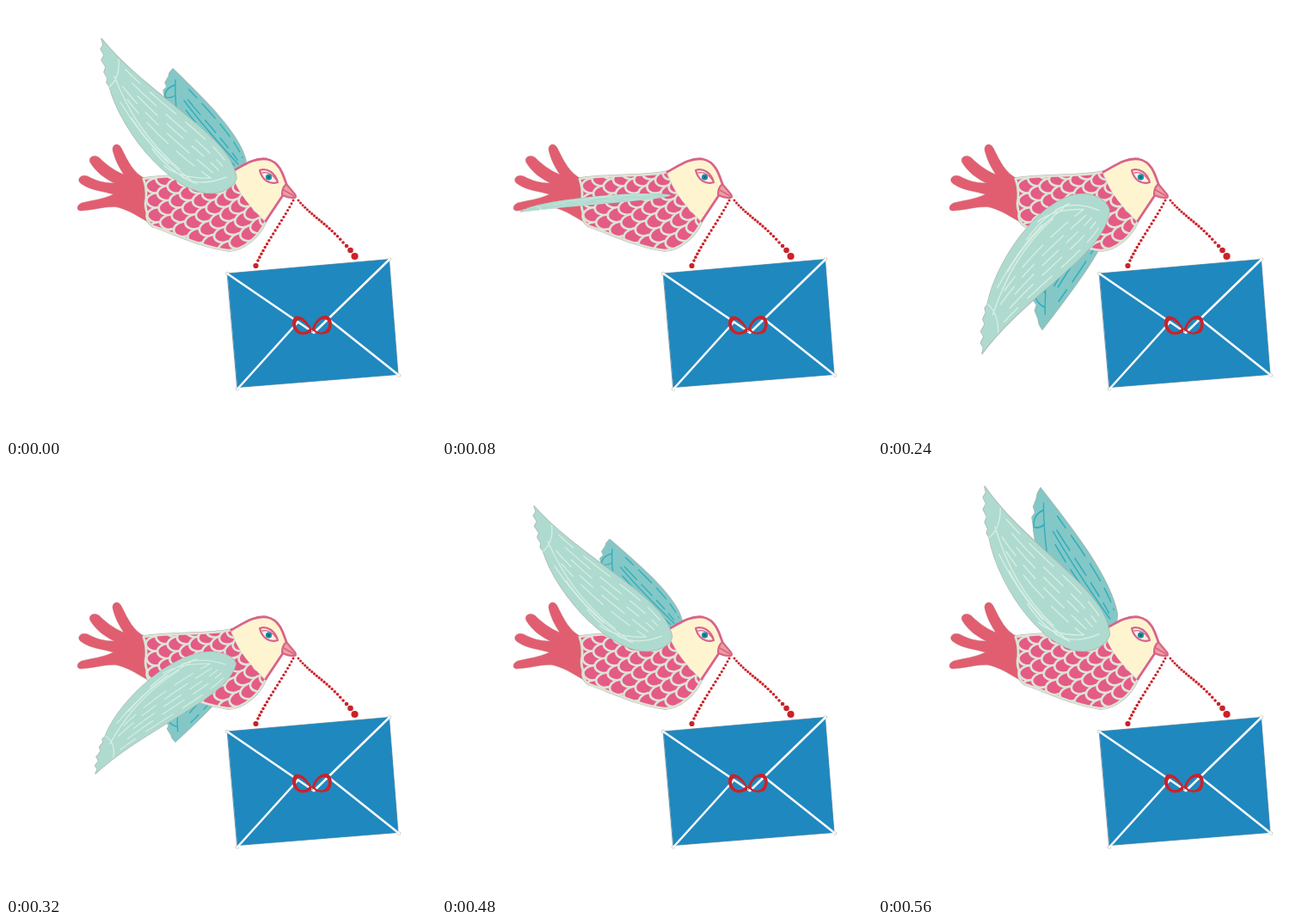
An HTML page with a canvas that plays this animation: 500 by 500 pixels, repeating every 0.64 s.

```html
<!DOCTYPE html>
<html lang="en">
<head>
<meta charset="utf-8">
<title>Bird with a letter</title>
<style>
html, body { margin: 0; width: 100%; height: 100%; overflow: hidden; background: #fff; }
canvas { display: block; width: 100vw; height: 100vh; }
</style>
</head>
<body>
<canvas id="stage"></canvas>
<script>
const SIZE = 500, STEP = 80;
const canvas = document.getElementById('stage');
const ctx = canvas.getContext('2d');
const ratio = window.devicePixelRatio || 1;
canvas.width = canvas.height = SIZE * ratio;

const PINK = '#e45b86', ROSE = '#d8638a', TAIL = '#e15e70';
const LINE = '#dfe3d5', EDGE = '#a9b5ad', RED = '#cb2229';

// Wing poses: [vertical stretch, sideways shift of the tip] for each wing
const POSES = [
  { near: [1, 0], far: [1, 0] },
  { near: [-0.12, -20], far: [-0.1, 5] },
  { near: [-1.01, 7], far: [-1.33, -2] },
  { near: [-1.035, 10], far: [-1.37, -3] },
  { near: [-0.79, -7], far: [-0.935, 3] },
  { near: [0.573, -15], far: [0.344, 5] },
  { near: [0.94, -4], far: [0.88, 1] },
  { near: [1.067, 13], far: [1.37, -5] }
];

const NEAR = {
  fill: '#afdacf', ink: '#d6eee3', pivot: 218, drop: 218, height: 180,
  upper: [111, 38, 165, 105, 262, 150, 268, 200],
  lower: [120, 93, 135, 150, 200, 225, 245, 217],
  shape: 'M111 38 C165 105 262 150 268 200 Q264 213 245 217 C200 225 135 150 120 93' +
    ' L117 89 118 84 114 77 116 71 111 63 114 57 110 50 113 45Z',
  veins: 'M131 62 Q133 84 119 95 M126 82 C142 122 164 158 202 190' +
    ' M133 112 Q158 153 189 183 M146 130 Q172 171 215 202 M170 166 Q190 193 222 207' +
    ' M184 186 Q203 201 238 200 M205 199 Q226 211 256 199',
  lanes: 5, from: 0.16, to: 0.85
};

const FAR = {
  fill: '#84c7c7', ink: '#2cafba', pivot: 195, drop: 209, height: 122,
  upper: [194, 73, 228, 106, 272, 148, 279, 180],
  lower: [184, 104, 185, 140, 220, 180, 262, 200],
  shape: 'M194 73 C228 106 272 148 279 180 L278 187 262 200 C220 180 185 140 184 104' +
    ' L183 98 187 94 185 89 189 82 190 78Z',
  veins: 'M197 86 Q196 103 199 128 M196 92 Q184 96 185 106 Q190 108 197 104' +
    ' M207 110 Q232 143 270 184',
  lanes: 3, from: 0.2, to: 0.94
};

const BODY = new Path2D('M160 201 C185 196 238 199 262 193 C268 207 272 220 302 250' +
  ' C294 268 276 284 259 284 C229 281 193 263 171 256 Q162 250 164 240 Q161 231 163 224 Q164 212 160 201Z');
const TAIL_SHAPE = new Path2D('M162 201 C148 194 142 181 134 165 C131 159 124 160 124 167' +
  ' C126 177 131 187 137 196 C125 191 116 184 108 176 C102 172 95 176 98 182' +
  ' C105 194 116 201 126 206 C114 206 104 203 95 198 C86 195 81 203 88 207' +
  ' C100 215 112 215 125 219 C112 225 100 226 88 229 C81 232 82 239 88 238' +
  ' C104 237 118 232 130 234 C145 238 155 246 167 252 L172 210Z');
const HEAD = new Path2D('M262 193 C275 186 288 176 303 178 C318 181 322 195 326 207 L321 221' +
  ' L302 250 C276 226 271 215 262 193Z');
const HEAD_EDGE = new Path2D('M262 193 C275 186 288 176 303 178 C318 181 322 195 326 207' +
  ' M322 220 L302 250');
const BEAK = new Path2D('M326 207 L336 219 Q339 224 332 223 Q324 222 321 219 Q321 211 326 207Z');
const EYE = new Path2D('M295 191 C304 188 313 194 316 205 C307 208 298 203 295 191Z');
const LID = new Path2D('M298 194 Q307 192 314 202');
const BOW = new Path2D('M357 379 C351 366 344 359 336 361 C330 367 333 380 343 382 Q352 383 357 377' +
  ' C362 383 370 383 376 379 C381 370 379 360 371 360 C364 360 357 369 355 378Z' +
  ' M353 375 C348 380 342 381 338 374 C335 367 340 363 344 366 Q350 370 353 375Z' +
  ' M359 376 C360 369 366 363 371 364 C377 366 376 374 371 378 Q364 382 359 376Z');

function fill(path, color, rule) {
  ctx.fillStyle = color;
  ctx.fill(path, rule || 'nonzero');
}

function stroke(path, color, width) {
  ctx.strokeStyle = color;
  ctx.lineWidth = width;
  ctx.stroke(path);
}

function dot(x, y, r, color) {
  ctx.beginPath();
  ctx.arc(x, y, r, 0, Math.PI * 2);
  ctx.fillStyle = color;
  ctx.fill();
}

function bezier(c, t) {
  const u = 1 - t;
  const w = [u * u * u, 3 * u * u * t, 3 * u * t * t, t * t * t];
  const axis = k => w.reduce((sum, v, i) => sum + v * c[2 * i + k], 0);
  return [axis(0), axis(1)];
}

// Broken streaks running between the two long edges of a wing
function streaks(wing) {
  const path = new Path2D();
  for (let lane = 0; lane < wing.lanes; lane++) {
    const across = 0.1 + lane * 0.62 / wing.lanes;
    let s = wing.from + (lane % 3) * 0.05;
    for (let n = lane; s < wing.to; n++) {
      const end = Math.min(s + 0.09 + (n * 7 % 4) * 0.022, wing.to);
      [s, (s + end) / 2, end].forEach((t, i) => {
        const a = bezier(wing.upper, t), b = bezier(wing.lower, t);
        const x = a[0] + (b[0] - a[0]) * across;
        const y = a[1] + (b[1] - a[1]) * across;
        if (i) path.lineTo(x, y); else path.moveTo(x, y);
      });
      s = end + 0.06;
    }
  }
  return path;
}

for (const wing of [NEAR, FAR]) {
  wing.outline = new Path2D(wing.shape);
  wing.detail = streaks(wing);
  wing.detail.addPath(new Path2D(wing.veins));
}

function drawWing(wing, [stretch, shift]) {
  const base = stretch < 0 ? wing.drop : wing.pivot;
  const skew = shift / wing.height;
  ctx.save();
  ctx.transform(1, 0, -skew, stretch, skew * wing.pivot, base - stretch * wing.pivot);
  stroke(wing.outline, EDGE, 1.4);
  fill(wing.outline, wing.fill);
  ctx.clip(wing.outline);
  stroke(wing.detail, wing.ink, 1.35);
  ctx.restore();
}

// Columns of scales fan out from the back, leaning more towards the chest
function drawScales() {
  ctx.save();
  ctx.clip(BODY);
  ctx.fillStyle = PINK;
  ctx.strokeStyle = LINE;
  ctx.lineWidth = 2.6;
  for (let col = 0; col < 11; col++) {
    const lean = 0.05 + col * 0.045;
    for (let row = 0; row < 7; row++) {
      const depth = row * 17 + (col % 2) * 8.5 - 4;
      const x = 175 + col * 12 + depth * Math.sin(lean);
      const y = 196 + depth * Math.cos(lean);
      ctx.beginPath();
      ctx.ellipse(x, y, 13, 8.8, -lean, 0, Math.PI * 2);
      ctx.fill();
      ctx.stroke();
    }
  }
  ctx.restore();
}

function drawBody() {
  stroke(TAIL_SHAPE, '#c9a9ab', 0.8);
  fill(TAIL_SHAPE, TAIL);
  stroke(BODY, EDGE, 3.4);
  fill(BODY, PINK);
  drawScales();
  stroke(BODY, LINE, 2.5);
}

function drawHead() {
  fill(HEAD, '#fff4d0');
  stroke(HEAD_EDGE, ROSE, 2.8);
  fill(BEAK, '#ee9f9c');
  stroke(BEAK, ROSE, 2.2);
  stroke(new Path2D('M323 214 L335 221'), ROSE, 1.5);
  fill(EYE, '#fdf1e4');
  stroke(EYE, ROSE, 2.2);
  stroke(LID, ROSE, 1.3);
  dot(305.5, 199, 3.6, '#178fa5');
  dot(305.5, 199, 1.5, '#1c6079');
}

function drawBeads(curve, count) {
  for (let i = 0; i <= count; i++) {
    const t = i / count;
    dot(...bezier(curve, t), 1.5 + 0.3 * t, RED);
  }
}

function drawLetter() {
  drawBeads([334, 226, 322, 249, 304, 273, 293, 296], 18);
  dot(290.5, 302, 3.1, RED);
  drawBeads([340, 226, 355, 244, 372, 252, 392, 275], 18);
  dot(396, 279, 2.3, RED);
  dot(400.5, 284, 3.3, RED);
  dot(405.5, 291, 4.1, RED);

  const sheet = new Path2D('M257.5 311 L445.5 294.5 456 428.5 269 443.5Z');
  stroke(sheet, '#8b9ba3', 1);
  fill(sheet, '#1f88bf');
  for (const [x, y] of [[257, 311], [446, 294.5], [457, 429.5], [269, 445.5]]) {
    dot(x, y, 2.1, EDGE);
    dot(x, y, 1.5, '#fff');
  }
  const folds = new Path2D('M257 311 L358 380 446 294.5 M269 445.5 L339 368 M457 429.5 L376 365');
  stroke(folds, '#f5fafc', 2.6);
  fill(BOW, RED, 'evenodd');
}

function draw(now) {
  const pose = POSES[Math.floor(now / STEP) % POSES.length];
  ctx.setTransform(ratio, 0, 0, ratio, 0, 0);
  ctx.fillStyle = '#fff';
  ctx.fillRect(0, 0, SIZE, SIZE);
  ctx.lineCap = ctx.lineJoin = 'round';
  drawWing(FAR, pose.far);
  drawBody();
  drawHead();
  drawWing(NEAR, pose.near);
  drawLetter();
}

const start = performance.now();
function tick() {
  draw(performance.now() - start);
  requestAnimationFrame(tick);
}
tick();
</script>
</body>
</html>
```
